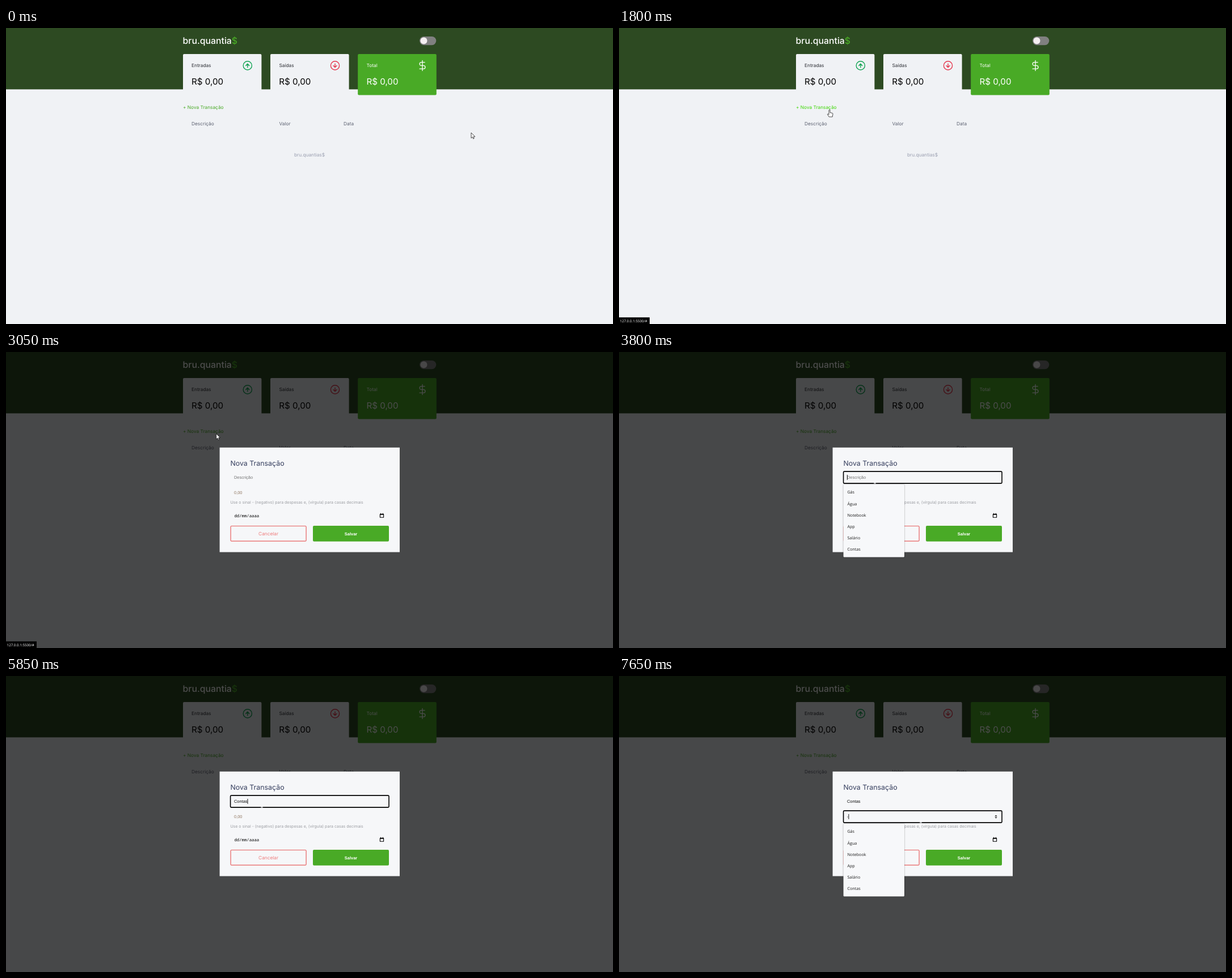
Write an HTML page that moves like this. It is 1070x523 px and loops after 8 s.

```html
<!DOCTYPE html>
<html lang="pt-BR">
<head>
<meta charset="utf-8">
<title>Nova Transação</title>
<style>
html, body { margin: 0; height: 100%; overflow: hidden; background: #f0f2f5 }
svg { display: block; width: 100vw; height: 100vh; text-rendering: geometricPrecision }
text { font: 8.3px Inter, sans-serif; white-space: pre }
.logo { font-size: 15.8px; font-weight: 500 }
.sum { font-size: 15.2px }
.title { font-size: 12.4px }
.hint { font-size: 7px }
.field { font: 7.45px "Liberation Sans", Arial, sans-serif }
.date { font: 7.3px "Noto Sans Mono", monospace }
.row { font: 500 7.2px "Open Sans", sans-serif }
.url { font: 6.2px "Open Sans", sans-serif }
.line { fill: none; stroke-linecap: round; stroke-linejoin: round }
#drop { filter: drop-shadow(0 .6px 1px #0006) }
</style>
</head>
<body>
<svg viewBox="0 0 1070 523">
  <rect width="1070" height="523" fill="#f0f2f5"/>
  <rect width="1070" height="108.4" fill="#2d4a22"/>
  <text class="logo" x="311.6" y="28" fill="#fff">bru.quantia<tspan fill="#49aa26">$</tspan></text>
  <rect x="729" y="15" width="29.3" height="15.2" rx="7.6" fill="#808080"/>
  <circle cx="736.5" cy="22.5" r="6" fill="#f4eff1"/>

  <g fill="#f0f2f5">
    <rect x="312" y="46" width="138.4" height="72.4" rx="2"/>
    <rect x="466" y="46" width="138.6" height="72.4" rx="2"/>
    <rect x="620.2" y="46" width="138.6" height="72.4" rx="2" fill="#49aa26"/>
  </g>
  <g fill="#2b2d33">
    <text x="327" y="69.4">Entradas</text>
    <text x="481.5" y="69.4">Saídas</text>
    <text x="635.6" y="69.4" fill="#fff">Total</text>
  </g>
  <g fill="#000">
    <text class="sum" x="327" y="100">R$ 0,00</text>
    <text class="sum" x="481.3" y="100">R$ 0,00</text>
    <text class="sum" x="635.4" y="100" fill="#fff">R$ 0,00</text>
  </g>
  <g class="line" stroke-width="1.4">
    <g transform="translate(425.8 66.4)" stroke="#12a454">
      <circle r="7.6"/><path d="M0 3.3V-3.2M-3 0L0-3.2L3 0"/>
    </g>
    <g transform="translate(580 66.4) scale(1 -1)" stroke="#e5384f">
      <circle r="7.6"/><path d="M0 3.3V-3.2M-3 0L0-3.2L3 0"/>
    </g>
    <path transform="translate(724.2 56.6) scale(.82)" stroke="#fff" stroke-width="1.6"
      d="M12 1v22M17 5H9.5a3.5 3.5 0 0 0 0 7h5a3.5 3.5 0 0 1 0 7H6"/>
  </g>

  <text id="link" x="312" y="142.7">+ Nova Transação</text>
  <g fill="#5d6272">
    <text x="327" y="172.2">Descrição</text>
    <text x="481.5" y="172.2">Valor</text>
    <text x="595" y="172.2">Data</text>
  </g>
  <text x="535" y="227" fill="#9a9fb0" text-anchor="middle">bru.quantias$</text>

  <g id="modal">
    <rect width="1070" height="523" opacity=".7"/>
    <rect x="376.6" y="168.8" width="317.4" height="184.8" fill="#f6f7f9"/>
    <text class="title" x="395.4" y="201" fill="#363f5f">Nova Transação</text>
    <text class="field" id="name" x="402" y="224.2"/>
    <text class="field" id="value" x="402" y="251.3"/>
    <text class="hint" x="395.4" y="267.8" fill="#9b9da2">Use o sinal - (negativo) para despesas e, (vírgula) para casas decimais</text>
    <text class="date" x="402.4" y="291.6">dd/mm/aaaa</text>
    <path d="M659.4 286.6h6.2v5.6h-6.2zM659.4 287.2h6.2M660.7 285v1.4M664.3 285v1.4" class="line" stroke="#000" stroke-width="1.1"/>
    <rect x="396.1" y="307.5" width="133" height="26.7" rx="1.5" fill="none" stroke="#e76060" stroke-width="1.2"/>
    <text x="462.6" y="323.8" fill="#ee7d7d" text-anchor="middle">Cancelar</text>
    <rect x="541" y="306.9" width="134" height="27.9" rx="2" fill="#49aa26"/>
    <text class="field" x="608" y="323.5" fill="#fff" text-anchor="middle" style="font-weight:700">Salvar</text>
    <path id="spin" d="M662.3 247.9h4.4l-2.2-2.5zM662.3 249.3h4.4l-2.2 2.5z" fill="#333"/>
    <rect id="focus" x="395.6" y="211.1" width="279.4" height="21" rx="1.6" fill="none" stroke="#000" stroke-width="1.6"/>
    <path id="caret" d="M0 217v9" stroke="#000" stroke-width=".9"/>
  </g>
  <path id="beam" d="M-2-5h4M0-5v10M-2 5.2h4" stroke="#f6f7f9" stroke-width="1.2"/>
  <g id="drop"><rect x="395.6" y="234" width="107.4" rx="1.5" fill="#f7f8fa"/><g id="rows" fill="#1c1c1c"></g></g>

  <g id="status">
    <rect y="511.3" width="54" height="12"/>
    <text class="url" x="1.6" y="519.6" fill="#fff">127.0.0.1:5500/#</text>
  </g>
  <path id="arrow" d="M0 0v9.6l2.2-2 1.5 3.2 1.5-.7-1.4-3.1h3.1z" fill="#fff" stroke="#000" stroke-width=".7"/>
  <path id="hand" d="M-1 1a1 1 0 0 1 2 0v4l4 .9q1 .3 1 1.4l-.8 5.2H-.8L-3.4 8.4q-.4-1.2.8-1.1l1.6 1.3z" fill="#fff" stroke="#000" stroke-width=".7"/>
</svg>
<script>
const LOOP = 8000, STEP = 50;
const el = id => document.getElementById(id);
const show = (id, on) => el(id).setAttribute('opacity', +on);
const move = (id, x, y) => el(id).setAttribute('transform', `translate(${x} ${y})`);
const within = (t, a, b) => t >= a && t < b;

// pointer track: time, x, y
const track = [
  [900, 820, 185], [1000, 765, 182], [1150, 555, 168], [1300, 397.5, 150.5],
  [1350, 366, 143], [1450, 345, 137], [1550, 384, 120], [1750, 524, 89.5],
  [1800, 371, 144.5], [2500, 371, 144.5], [2550, 371.3, 145], [2950, 371.3, 145],
  [3000, 370.7, 144.5], [3250, 370.7, 144.5], [3400, 428, 212], [3450, 451, 226.8],
  [6000, 451, 226.8], [6500, 532, 253.8]
];
const typing = [[4400, 'C'], [4550, 'o'], [4850, 'n'], [5000, 't'], [5450, 'a'], [5750, 's']];
const options = ['Gás', 'Água', 'Notebook', 'App', 'Salário', 'Contas'];

function pointer(t) {
  const i = track.findIndex(p => p[0] > t);
  if (i === 0) return track[0].slice(1);
  if (i < 0) return track[track.length - 1].slice(1);
  const [a, b] = [track[i - 1], track[i]], k = (t - a[0]) / (b[0] - a[0]);
  return [1, 2].map(n => a[n] + (b[n] - a[n]) * k);
}

function input(id, text, hint, hintColor) {
  el(id).textContent = text || hint;
  el(id).setAttribute('fill', text ? '#111' : hintColor);
  return 402.4 + (text ? el(id).getComputedTextLength() : 0);
}

let shown = '';
function list(items) {
  if (shown === items.join()) return;
  shown = items.join();
  el('drop').firstChild.setAttribute('height', 28 + 20.1 * (items.length - 1));
  el('rows').innerHTML = items.map((s, i) =>
    `<text class="row" x="402.4" y="${250.4 + 20.1 * i}">${s}</text>`).join('');
}

// the list blinks while it is filtered again
function listOpacity(t) {
  if (t < 3800 || within(t, 5850, 6600)) return 0;
  if (within(t, 5750, 5850)) return .4;
  const start = [4550, 5000, 5450].find(s => within(t, s, s + 100));
  return start ? (t - start) / 100 : 1;
}

function draw(now) {
  const t = Math.floor(now % LOOP / STEP) * STEP;
  const [x, y] = pointer(t), second = t >= 6600, shift = second ? 27 : 0;
  const hover = within(t, 1350, 1550) || within(t, 1800, 3050);
  const hand = within(t, 1350, 1500) || within(t, 1800, 3000);

  for (const id of ['arrow', 'hand', 'beam']) move(id, x, y);
  show('hand', hand);
  show('arrow', !hand && t < 3450);
  show('beam', t >= 3450);
  el('link').setAttribute('fill', hover ? '#3dd705' : '#49aa26');
  show('status', within(t, 1400, 1650) || within(t, 1800, 3400));
  show('modal', t >= 3050);

  const name = typing.filter(k => k[0] <= t).map(k => k[1]).join('');
  const ends = [
    input('name', name, 'Descrição', '#757575'),
    input('value', t >= 7650 ? '-' : '', '0,00', '#8f765f')
  ];
  show('focus', t >= 3800);
  move('focus', 0, shift);
  show('caret', within(t, 3800, 4200) || within(t, 4400, 7000) || t >= 7450);
  show('spin', t >= 6400);
  if (t < 3800) show('caret', 0);
  move('caret', ends[+second], shift);

  list(t < 4400 || second ? options : t < 5450 ? ['Contas', 'Controle'] : ['Contas']);
  show('drop', listOpacity(t));
  move('drop', 0, shift);
}

const start = performance.now();
(function tick() {
  draw(performance.now() - start);
  requestAnimationFrame(tick);
})();
</script>
</body>
</html>
```
